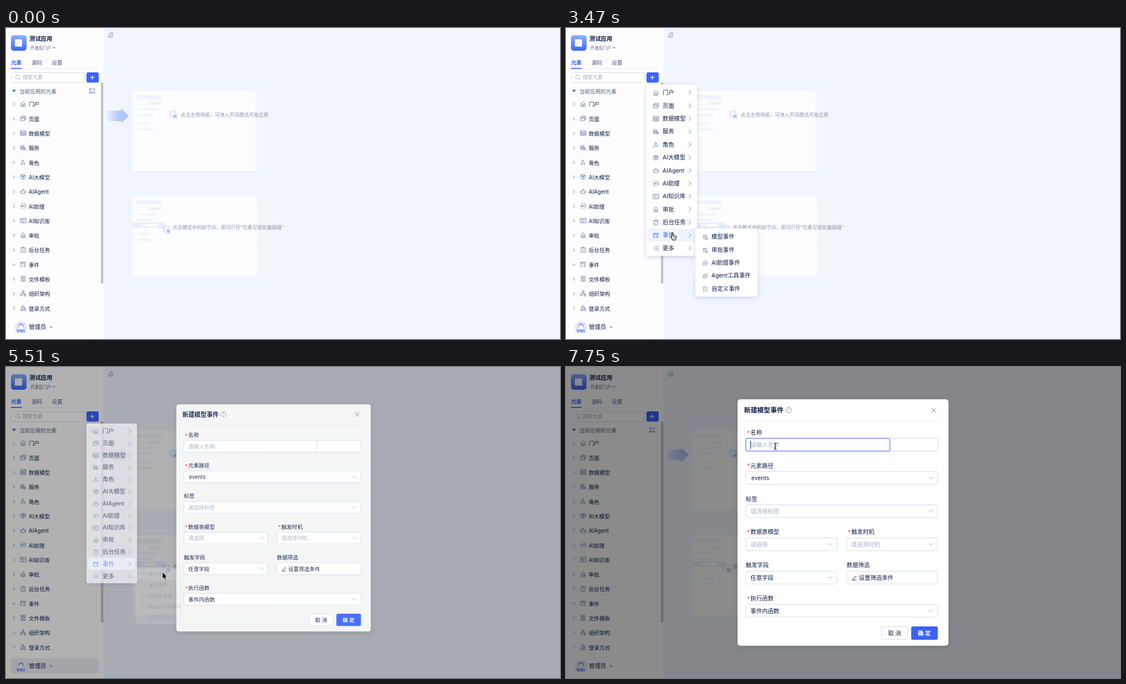
Recreate the animation shown at these times as an HTML page with a canvas. Size 998 by 561 pixels, loop 8 s.

```html
<!DOCTYPE html>
<html lang="zh-CN">
<head>
<meta charset="utf-8">
<title>新建模型事件</title>
<style>
html, body { margin: 0; width: 100%; height: 100%; overflow: hidden; background: #f1f5fe; }
canvas { display: block; width: 998px; height: 561px; }
</style>
</head>
<body>
<canvas id="stage"></canvas>
<script>
const W = 998, H = 561, LOOP = 8000;
const canvas = document.getElementById('stage');
const ctx = canvas.getContext('2d');
const dpr = window.devicePixelRatio || 1;
canvas.width = W * dpr;
canvas.height = H * dpr;

const FONT = 'Inter, "Noto Sans CJK SC", "Noto Sans CJK", sans-serif';
const BLUE = '#3a62ff', INK = '#0d1b45', SLATE = '#4d5b7b', MUTED = '#a3adc4', LINE = '#d5dbea', ICON = '#66759a';

// Line icons on a 12 x 12 grid
const ICONS = {
  home: 'M1.2 5.6L6 1.4l4.8 4.2M2 5v6h8V5M4.5 11V7.2h3V11',
  page: 'M3.2 3.4V1.2h8.3v6.6H9.4M.6 3.6h8.6v7H.6zM.6 6h8.6',
  table: 'M.3 1h11.4v10H.3zM.3 4.2h11.4M.3 7.6h11.4M4.1 4.2V11M7.9 4.2V11',
  service: 'M1.3 3a3.4 1.4 0 1 0 6.8 0a3.4 1.4 0 1 0-6.8 0v6a3.4 1.4 0 0 0 4 1.4M1.3 5a3.4 1.4 0 0 0 6.8 0V3M1.3 7a3.4 1.4 0 0 0 4 1.4M6.5 6.8h4.3v3.8H6.5zM6.5 8.6h4.3',
  role: 'M3.4 3.5a2 2 0 1 0 4 0a2 2 0 1 0-4 0M5.5 10.4H1.6c0-2.6 1.4-3.8 3.6-3.8M7 8.8a1.7 1.7 0 1 0 3.4 0a1.7 1.7 0 1 0-3.4 0',
  model: 'M6 .6l4.8 2.7v5.4L6 11.4 1.2 8.7V3.3zM6 6.2L1.2 3.3M6 6.2l4.8-2.9M6 6.2v5.2M3.5 2l5 5.6M8.5 2l-5 5.6',
  agent: 'M2 4.3h8v6.2H2zM.2 6.2v2.4M11.8 6.2v2.4M6 4.3V1.6M4.8 1.6h2.4M4.2 7v1M7.8 7v1',
  assist: 'M4.2 11.2H2.6L2.2 9A5 5 0 0 1 5 1M7 .9a5 5 0 0 1 1.6 9.6l-.8.9M3.4 8L5 4.2 6.6 8M4 6.8h2M8.2 4.2V8',
  book: 'M.2 1.4h4.6L6 2.2l1.2-.8h4.6v9.2H7.2l-1.2.8-1.2-.8H.2zM6 2.2v9M2 4.2h1.6v2.4H2M8.4 4.2H10M8.4 6.5H10',
  stamp: 'M1.8 11.2h8.4M1.6 9.2V7.2h3V5.4a2.3 2.3 0 1 1 2.8 0v1.8h3v2z',
  task: 'M4 2H1.8v9.2h8.4V2H8M4 1h4v2H4zM4 7l1.4 1.4L8.2 5.6',
  event: 'M10.8 5V2H1v8.4h4.4M1 4.6h9.8M3.6.8v2M8.2.8v2M11.2 7.2H8.4v3.6M7 10.8h4.4M6.6 7.4h1',
  file: 'M2 .8h8v10.4H2zM4 3h4v2.6H4zM4 7.4h2M4 9.2h4M7.4 7.4H8',
  org: 'M4.3.8h3.4V4H4.3zM.8 8h3.2v3.2H.8zM8 8h3.2v3.2H8zM6 4v2M2.4 8V6h7.2v2',
  login: 'M.6 11.2h10.8M2 11V5.4l2.6-1.6M4.6 11V1l3 1.4V11M7.6 5.6h2.4V11',
  more: 'M3.6 2.4h8M3.6 6h8M3.6 9.6h8M.6 2.4h1.2M.6 6h1.2M.6 9.6h1.2',
  tree: 'M1 1.2h4v3.4H1zM1 8h2.6v2.6H1zM5.6 8h2.6v2.6H5.6zM9.6 8h2v2.6h-2M7 1.4h4v3.4M9.6 3.6L11 5l1.2-1.4',
  pen: 'M2 8.6L8.6 2 10.4 3.8 3.8 10.4H2zM1 11.6h10',
  sub: 'M9 4V2H2v7h2.6M2 4h5M5 6h3.5v1.6M6 8h4.6v3H6z',
  talk: 'M1.6 10.4V6a4.6 4.6 0 1 1 4.4 4.6zM3.6 7.6L4.9 4.4l1.3 3.2M8 4.4v3.2',
  custom: 'M9 4V2H2v7h2.6M5 5.6h4l1.4 2.4L9 10.4H6M1.6 11h3'
};
const paths = {};
for (const k in ICONS) paths[k] = new Path2D(ICONS[k]);

const ITEMS = [['门户', 'home'], ['页面', 'page'], ['数据模型', 'table'], ['服务', 'service'], ['角色', 'role'],
  ['AI大模型', 'model'], ['AIAgent', 'agent'], ['AI助理', 'assist'], ['AI知识库', 'book'], ['审批', 'stamp'],
  ['后台任务', 'task'], ['事件', 'event']];
const SIDE = [...ITEMS, ['文件模板', 'file'], ['组织架构', 'org'], ['登录方式', 'login']];
const MENU = [...ITEMS, ['更多', 'more']];
const SUB = [['模型事件', 'sub'], ['审批事件', 'sub'], ['AI助理事件', 'talk'], ['Agent工具事件', 'talk'], ['自定义事件', 'custom']];

const clamp = v => Math.max(0, Math.min(1, v));
const part = (t, from, len) => clamp((t - from) / len);
const smooth = u => u * u * (3 - 2 * u);
const inOut = u => u < .5 ? 4 * u ** 3 : 1 - 4 * (1 - u) ** 3;

function text(s, x, y, size, color = INK, weight = 400) {
  ctx.font = `${weight} ${size}px ${FONT}`;
  ctx.fillStyle = color;
  ctx.fillText(s, x, y + size * .37);
}
function box(x, y, w, h, r, fill, stroke) {
  ctx.beginPath();
  ctx.roundRect(x, y, w, h, r);
  if (fill) { ctx.fillStyle = fill; ctx.fill(); }
  if (stroke) { ctx.strokeStyle = stroke; ctx.lineWidth = 1; ctx.stroke(); }
}
function line(color, width, ...pts) {
  ctx.beginPath();
  for (let i = 0; i < pts.length; i += 2) ctx.lineTo(pts[i], pts[i + 1]);
  ctx.strokeStyle = color;
  ctx.lineWidth = width;
  ctx.stroke();
}
function shape(color, ...pts) {
  ctx.beginPath();
  for (let i = 0; i < pts.length; i += 2) ctx.lineTo(pts[i], pts[i + 1]);
  ctx.fillStyle = color;
  ctx.fill();
}
function disc(x, y, r, fill) {
  ctx.beginPath();
  ctx.arc(x, y, r, 0, 7);
  ctx.fillStyle = fill;
  ctx.fill();
}
function icon(name, x, y, size = 10.5, color = ICON) {
  ctx.save();
  ctx.translate(x - size / 2, y - size / 2);
  ctx.scale(size / 12, size / 12);
  ctx.strokeStyle = color;
  ctx.lineWidth = .95;
  ctx.stroke(paths[name]);
  ctx.restore();
}
const chevron = (x, y, color, s = 2) => line(color, .9, x - s / 2, y - s * 1.5, x + s, y, x - s / 2, y + s * 1.5);
const down = (x, y, color, s = 3) => line(color, .9, x - s, y - s * .6, x, y + s * .6, x + s, y - s * .6);
const caretDown = (x, y, w, color) => shape(color, x - w, y - w * .5, x + w, y - w * .5, x, y + w * .65);
function fade(x0, x1, ...stops) {
  const g = ctx.createLinearGradient(x0, 0, x1, 0);
  stops.forEach((c, i) => g.addColorStop(i / (stops.length - 1), c));
  return g;
}
function raised(x, y, w, h, r, blur, color) {
  ctx.save();
  ctx.shadowColor = color;
  ctx.shadowBlur = blur * dpr;
  ctx.shadowOffsetY = 2 * dpr;
  box(x, y, w, h, r, '#fff');
  ctx.restore();
}

function spark(x, y) {
  for (let i = 0; i < 7; i++) {
    const a = Math.PI * (.5 + i / 4), c = Math.cos(a), s = Math.sin(a);
    line('#b3c7ff', 1.4, x + c * 4, y + s * 4, x + c * 7.5, y + s * 7.5);
  }
  shape('#a9c0ff', x, y, x + 8, y + 3, x + 5, y + 4.6, x + 7.6, y + 7.4, x + 6.4, y + 8.4, x + 4, y + 5.8, x + 2.6, y + 8);
}

function card(y, edge, picked) {
  const bar = '#f1f4fb';
  box(edge, y, 505 - edge, 144, 0, fade(edge, 505, '#f3f7fc', '#f2f6fc', 'rgba(241,245,254,0)'));
  box(228, y, edge - 228, 144, 0, '#fcfdff');
  box(234, y + 7.5, 46.5, 7.5, 1, '#eff3fb');
  box(234, y + 20.5, 46.5, 5, 2.5, '#edf1fa');
  box(235, y + 21, 24, 4, 2, '#fff');
  const rows = [[32, 30], [42.5, 23], [57.5, 18], [68, 25]];
  rows.forEach(([dy, w], i) => {
    const yy = y + dy + (picked && i > 1 ? 10 : 0);
    disc(236.5, yy + 1, 2, bar);
    box(241.5, yy - 1.5, w, 5, 1, bar);
  });
  if (picked) {
    box(228, y + 48, 58, 10, 0, fade(228, 288, '#e7eefd', '#e9effe'));
    disc(245.5, y + 53, 2.5, '#fff');
    box(250, y + 50.5, 23, 5, 2, '#fff');
  }
}

function stageBase(t) {
  ctx.fillStyle = '#f1f5fe';
  ctx.fillRect(0, 0, W, H);
  card(113.5, 449, false);
  card(303, 452, true);
  shape(fade(180, 222, 'rgba(176,199,255,0)', '#b9ccff', '#a5bdfb'),
    180, 149, 207, 149, 207, 145, 221, 158.5, 207, 172, 207, 168, 180, 168);
  spark(301, 155.5);
  spark(289, 362.5);
  text('点击左侧导航，可进入不同模式开发应用', 315, 156.5, 8.75, '#8793ae');
  text('点击模式中的树节点，即可打开“元素可视化编辑器”', 300, 359.5, 8.75, '#8793ae');

  line('#54627f', .9, 187, 9, 193, 9);
  line('#54627f', .9, 188.5, 12.5, 193, 12.5);
  line('#54627f', .9, 184, 16, 193, 16);
  line('#54627f', .9, 186.5, 10.5, 184.3, 12.5, 186.5, 14.2);
  sidebar(t);
}

function sidebar(t) {
  ctx.fillStyle = '#fdfdff';
  ctx.fillRect(0, 0, 175.5, H);
  const g = ctx.createLinearGradient(0, 13, 0, 41);
  g.addColorStop(0, '#8db0ff');
  g.addColorStop(1, '#3c64fb');
  box(9, 13, 28, 28, 5, g);
  box(16, 20.5, 13, 13, 0, '#f4f7ff');
  text('测试应用', 42, 19, 10.4, INK, 600);
  text('开发区门户', 44, 36, 7.5, SLATE);
  caretDown(86.5, 36, 3.2, '#a9b2c6');
  text('元素', 9, 62.5, 9.6, BLUE, 600);
  text('源码', 46, 62.5, 9.6, SLATE);
  text('设置', 82.5, 62.5, 9.6, SLATE);
  line('#e9edf6', 1, 9, 73.5, 167, 73.5);
  box(9, 72, 19, 1.7, 0, BLUE);

  box(9.5, 80.5, 132, 18, 3, '#fff', LINE);
  ctx.beginPath();
  ctx.arc(21, 88.5, 3.6, 0, 7);
  ctx.strokeStyle = '#9ba6be';
  ctx.lineWidth = .9;
  ctx.stroke();
  line('#9ba6be', .9, 23.6, 91, 25.6, 93.2);
  text('搜索元素', 30, 89, 9, MUTED);
  const hover = part(t, 1715, 120) * (1 - part(t, 2400, 120));
  box(145, 80, 22, 18.5, 3, BLUE);
  box(145, 80, 22, 18.5, 3, `rgba(255,255,255,${.14 * hover})`);
  line('#fff', 1.2, 151.5, 89.2, 159.5, 89.2);
  line('#fff', 1.2, 155.5, 85.2, 155.5, 93.2);

  caretDown(14.5, 113.5, 3.8, '#5d6f98');
  text('当前应用的元素', 24, 114.3, 9.6, SLATE);
  icon('tree', 155, 113.5, 10.5);
  SIDE.forEach(([name, ic], i) => {
    const y = 137.5 + 26.29 * i;
    if (i === 11) down(14, y, '#68779a', 2.8);
    else chevron(13.7, y, '#68779a');
    icon(ic, 30.8, y - .6);
    text(name, 41, y + .4, 9.65);
  });
  box(171, 98, 4.3, 363, 1.5, '#c1c2c4');

  const glow = part(t, 5270, 80) * (1 - part(t, 5580, 110));
  if (glow) box(9, 525, 158, 28, 3, `rgba(70,85,125,${.1 * glow})`);
  ctx.save();
  ctx.beginPath();
  ctx.arc(27, 540, 11.3, 0, 7);
  ctx.clip();
  ctx.fillStyle = '#e2e7f1';
  ctx.fillRect(15, 528, 24, 24);
  disc(27, 537.5, 4.6, '#8f9bb4');
  disc(27, 539, 3.4, '#f3f5fa');
  box(19, 543, 16, 10, 5, '#f3f6ff');
  ctx.restore();
  text('管理员', 19.3, 546, 5.1, BLUE, 700);
  text('管理员', 41.3, 539.5, 10.4);
  caretDown(81, 540, 3.4, '#a9b2c6');
}

function mainMenu(t, active) {
  const open = 1 - (1 - part(t, 1890, 260)) ** 5;
  const shut = part(t, 5250, 390) ** 2.7;
  const e = open * (1 - shut);
  if (e <= 0) return;
  ctx.save();
  ctx.globalAlpha = e;
  ctx.translate(0, 102);
  ctx.scale(1, .8 + .2 * e);
  ctx.translate(0, -102);
  raised(145, 102, 91, 309, 4, 10, 'rgba(40,60,110,.2)');
  MENU.forEach(([name, ic], i) => {
    const y = 116.4 + 23.38 * i, on = i === active;
    if (on) box(148, y - 11.7, 85, 23.4, 3, '#f0f4ff');
    icon(ic, 162, y + .4, 10.5, on ? BLUE : ICON);
    text(name, 174, y, 10.4, on ? BLUE : INK);
    chevron(222.5, y + .3, '#66759a', 2.7);
  });
  ctx.restore();
}

function subMenu(t) {
  const open = 1 - (1 - part(t, 3290, 170)) ** 4;
  const e = open * (1 - inOut(part(t, 5250, 390)));
  if (e <= 0) return;
  ctx.save();
  ctx.globalAlpha = e;
  ctx.translate(233, 361.5);
  ctx.scale(.8 + .2 * e, .8 + .2 * e);
  ctx.translate(-233, -361.5);
  raised(233, 361.5, 112, 123, 4, 10, 'rgba(40,60,110,.2)');
  const hover = t > 4000;
  if (hover) box(236, 364.8, 106, 23.4, 3, t < 5280 ? '#f0f4ff' : '#f2f4f8');
  SUB.forEach(([name, ic], i) => {
    const y = 376.5 + 23.37 * i, on = hover && !i && t < 5280;
    icon(ic, 251, y + .8, 10, on ? BLUE : ICON);
    text(name, 262, y, 10.4, on ? BLUE : INK);
  });
  ctx.restore();
}

function field(label, value, x, y, w, must, opt = {}) {
  if (must) text('*', x + 2, y - 21.5, 10.4, '#f0384a');
  text(label, x + (must ? 8.5 : 0), y - 22.3, 10.4, INK, 500);
  box(x, y - 11.5, w, 23, 3, '#fff', LINE);
  const indent = opt.pen ? 22 : value === 'events' ? 10 : 8.5;
  text(value, x + indent, y + .2, 10.4, opt.set ? INK : MUTED);
  if (opt.pen) icon('pen', x + 14, y + .4, 9.5, INK);
  if (!opt.plain) down(x + w - 12.5, y, '#a9b2c8', 3.8);
}

function dialog(t) {
  const u = part(t, 5250, 390);
  if (!u) return;
  ctx.fillStyle = `rgba(0,0,0,${.45 * u})`;
  ctx.fillRect(0, 0, W, H);

  const e = 1 - (1 - u) ** 2.1, k = .2 + .8 * e;
  ctx.save();
  ctx.globalAlpha = e;
  ctx.translate(282, 176);
  ctx.scale(k, k);
  ctx.translate(-282, -176);
  raised(309, 58.3, 380, 444.4, 5, 12, 'rgba(0,0,0,.14)');
  text('新建模型事件', 320.8, 78, 11.85, INK, 600);
  ctx.beginPath();
  ctx.arc(401, 77.6, 5, 0, 7);
  ctx.strokeStyle = '#8591aa';
  ctx.lineWidth = .9;
  ctx.stroke();
  text('?', 398.9, 77.7, 7.5, '#8591aa');
  line('#6b7893', 1, 658.3, 73.8, 666.7, 82.2);
  line('#6b7893', 1, 666.7, 73.8, 658.3, 82.2);
  line('#edf0f6', 1, 321, 97.5, 677, 97.5);

  field('名称', '请输入名称', 323.8, 140.2, 345.8, true, { plain: true });
  line(LINE, 1, 583.5, 128.7, 583.5, 151.7);
  field('元素路径', 'events', 323.8, 200.1, 345.8, true, { set: true });
  field('标签', '请选择标签', 323.8, 260, 345.8, false);
  field('数据表模型', '请选择', 323.8, 319.9, 164, true);
  field('触发时机', '请选择时机', 505.6, 319.9, 164, true);
  field('触发字段', '任意字段', 323.8, 379.8, 164, false, { set: true });
  field('数据筛选', '设置筛选条件', 505.6, 379.8, 164, false, { set: true, plain: true, pen: true });
  field('执行函数', '事件内函数', 323.8, 439.7, 345.8, true, { set: true });

  const focus = part(t, 6460, 160);
  if (focus) box(324, 128.7, 259.5, 23, 2, null, `rgba(58,98,255,${focus})`);
  if (t >= 6700 && (t < 7300 || t >= 7750)) line(INK, 1, 332.5, 133.5, 332.5, 147.5);

  box(568.5, 468.5, 47, 23, 3, '#fff', LINE);
  text('取 消', 580.2, 480.2, 10.4, INK, 500);
  box(621.8, 468, 48, 24, 3, BLUE);
  text('确 定', 633.8, 480.2, 10.4, '#fff', 600);
  ctx.restore();
}

// Pointer stops: time, x, y
const STOPS = [[250, 617, 529], [370, 281, 204], [620, 281, 204], [1260, 161, 88], [1710, 161, 88],
  [1800, 154.5, 87], [2350, 154.5, 87], [3080, 193, 325], [3180, 193, 325], [3290, 192, 369.5],
  [3760, 192, 369.5], [4110, 282, 370.5], [5870, 282, 370.5], [6070, 389, 155], [6400, 389, 155], [6570, 377, 143]];

function pointerAt(t) {
  const n = STOPS.findIndex(s => s[0] > t);
  if (n < 0) return STOPS[STOPS.length - 1].slice(1);
  const a = STOPS[Math.max(0, n - 1)], b = STOPS[n];
  const u = smooth(part(t, a[0], b[0] - a[0] || 1));
  return [a[1] + (b[1] - a[1]) * u, a[2] + (b[2] - a[2]) * u];
}

const ARROW = new Path2D('M0 0v11l2.5-2.3 1.7 4 1.9-.8-1.7-3.9h3.5z');
const HAND = new Path2D('M-1.2 7V1a1.1 1.1 0 0 1 2.2 0v4l4 .8q1.5.4 1.4 1.8l-.5 2.6-.8 2.8H.2L-3 8.4q-.8-1.5.6-1.8z');
const BEAM = new Path2D('M-2.5-5.5q2.5 0 2.5 1.5q0-1.5 2.5-1.5M0-4v8M-2.5 5.5q2.5 0 2.5-1.5q0 1.5 2.5 1.5M-1.2 1.5h2.4');

function pointer(t, x, y) {
  if (t < 250) return;
  ctx.save();
  ctx.translate(x, y);
  ctx.lineJoin = 'round';
  const beam = t >= 6450, hand = t >= 1710 && t < 4320;
  if (beam) {
    ctx.strokeStyle = '#fff';
    ctx.lineWidth = 2;
    ctx.stroke(BEAM);
    ctx.strokeStyle = '#000';
    ctx.lineWidth = 1.1;
    ctx.stroke(BEAM);
  } else if (hand) {
    ctx.fillStyle = '#fff';
    ctx.strokeStyle = '#000';
    ctx.lineWidth = 1.1;
    ctx.fill(HAND);
    ctx.stroke(HAND);
    line('#000', .7, 1.3, 7.5, 1.3, 10.5);
    line('#000', .7, 3.2, 7.5, 3.2, 10.5);
  } else {
    ctx.strokeStyle = '#fff';
    ctx.lineWidth = 1.5;
    ctx.stroke(ARROW);
    ctx.fillStyle = '#000';
    ctx.fill(ARROW);
  }
  ctx.restore();
}

function draw(t) {
  ctx.setTransform(dpr, 0, 0, dpr, 0, 0);
  const [x, y] = pointerAt(t);
  const active = t >= 3290 ? 11 : y > 105 && x < 233 ? Math.floor((y - 104.7) / 23.38) : -1;
  stageBase(t);
  dialog(t);
  mainMenu(t, active);
  subMenu(t);
  pointer(t, x, y);
}

const start = performance.now();
function tick() {
  draw((performance.now() - start) % LOOP);
  requestAnimationFrame(tick);
}
tick();
</script>
</body>
</html>
```
